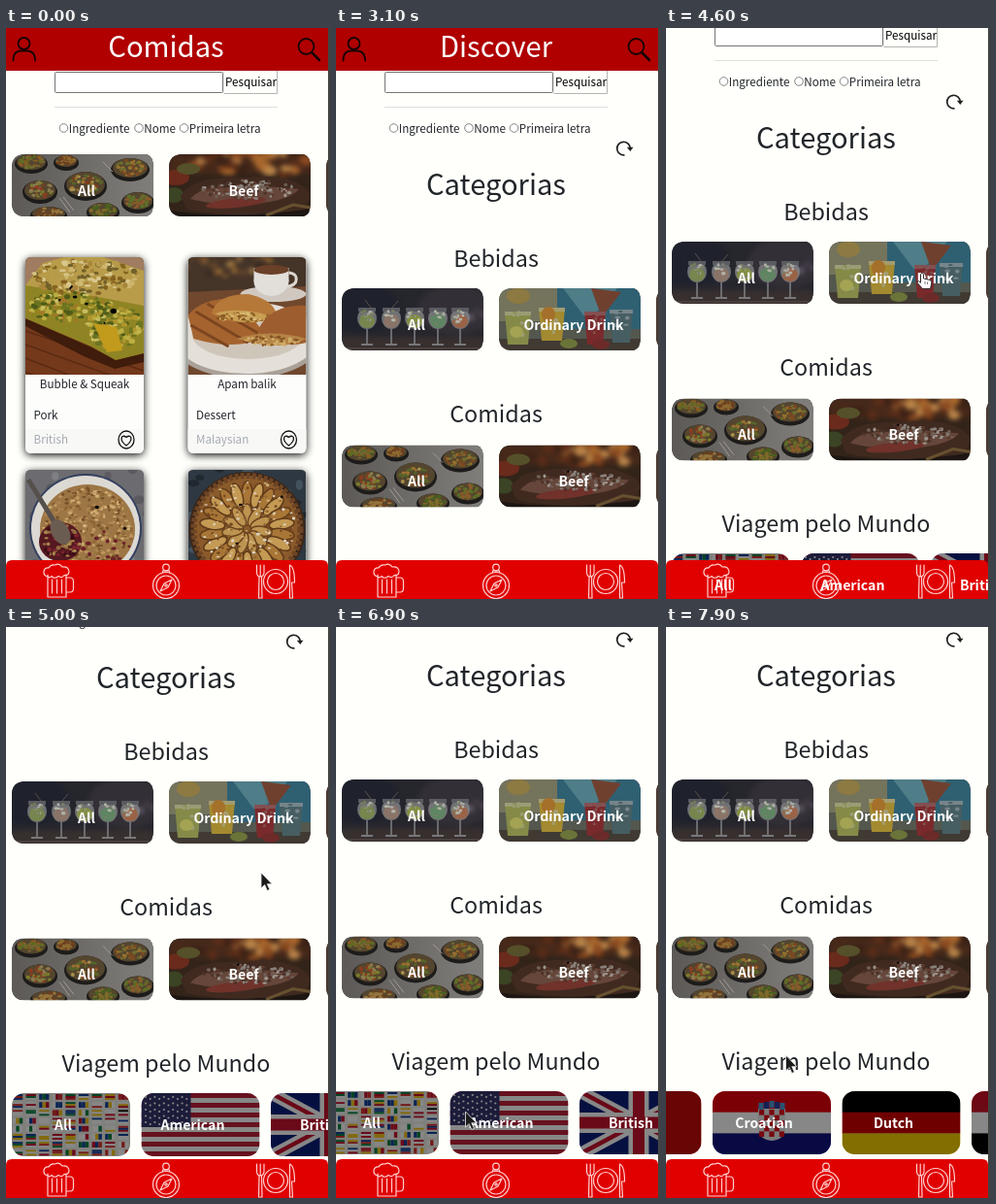
Animation of 334 by 588 pixels, one loop 8000 ms. Source, as an HTML page:

```html
<!DOCTYPE html>
<html lang="pt">
<head>
<meta charset="utf-8">
<title>Receitas</title>
<style>
html, body { margin: 0; width: 100%; height: 100%; overflow: hidden; background: #fffffb; }
svg { display: block; width: 334px; height: 588px; }
text { font-family: "Noto Sans CJK JP", "Noto Sans CJK SC", "Noto Sans", sans-serif; font-size: 11.65px; fill: #212529; }
.h1 { font-size: 29.15px; }
.h2 { font-size: 23.35px; }
.tag { font-size: 14.1px; font-weight: 700; fill: #fff; }
.box { filter: drop-shadow(0 2px 4px rgba(0,0,0,.95)); }
.soft { filter: blur(.6px); }
.haze { filter: blur(2.5px); }
.ico { fill: none; stroke: #ffd0d0; stroke-width: 1.2; stroke-linecap: round; stroke-linejoin: round; }
.blk { fill: none; stroke: #170404; stroke-width: 1.8; stroke-linecap: round; stroke-linejoin: round; }
</style>
</head>
<body>
<svg id="stage" viewBox="0 0 334 588" xmlns="http://www.w3.org/2000/svg"></svg>
<script>
const E = (x, y, rx, ry, fill, more = '') => `<ellipse cx="${x}" cy="${y}" rx="${rx}" ry="${ry}" fill="${fill}" ${more}/>`;
const R = (x, y, w, h, fill, more = '') => `<rect x="${x}" y="${y}" width="${w}" height="${h}" fill="${fill}" ${more}/>`;
const P = (d, fill, more = '') => `<path d="${d}" fill="${fill}" ${more}/>`;
const L = (d, color, w = 1) => `<path d="${d}" fill="none" stroke="${color}" stroke-width="${w}"/>`;
const T = (x, y, s, cls = '', more = '') => `<text x="${x}" y="${y}" class="${cls}" ${more}>${s}</text>`;
const M = (x, y, s, cls, more = '') => T(x, y, s, cls, 'text-anchor="middle" ' + more);
const G = (id, s, more = '') => `<g id="${id}" ${more}>${s}</g>`;
const at = (x, y, s, more = '') => `<g transform="translate(${x} ${y})" ${more}>${s}</g>`;
const many = (n, fn) => Array.from({ length: n }, (_, i) => fn(i)).join('');
const soft = (s, cls = 'soft') => `<g class="${cls}">${s}</g>`;

let seed = 7;
const rnd = (a = 0, b = 1) => {
  seed = (seed * 16807) % 2147483647;
  return +(a + (b - a) * seed / 2147483647).toFixed(2);
};
const pick = list => list[Math.floor(rnd() * list.length)];
// random flecks inside an ellipse
const flecks = (n, x, y, rx, ry, colors, size) => many(n, () => {
  const a = rnd(0, 6.283), d = Math.sqrt(rnd());
  return E((x + rx * d * Math.cos(a)).toFixed(1), (y + ry * d * Math.sin(a)).toFixed(1),
    rnd(size * .5, size), rnd(size * .35, size * .8), pick(colors));
});

// category pictures, 146 x 64
const bowl = (x, y, rx, ry, c) => E(x, y + 2, rx + 2, ry + 2, '#1d1c1b') + E(x, y, rx, ry, '#54452e') +
  flecks(40, x, y, rx * .85, ry * .8, c, 2.6);
const foodAll = () => R(0, 0, 146, 64, 'url(#table)') +
  bowl(20, 8, 15, 8, ['#5f6a24', '#8a5a24', '#766a34']) + bowl(56, 7, 11, 6, ['#8c6a30', '#704020']) +
  bowl(122, 14, 18, 10, ['#96702c', '#7c4a22', '#6c6d30']) + bowl(29, 37, 16, 10, ['#7a7a2c', '#8c3c20', '#8a7a50']) +
  bowl(76, 31, 20, 13, ['#9a7030', '#7e3c1c', '#56642a', '#a8904c']) + bowl(130, 48, 15, 9, ['#5c6e28', '#8a5a2c']) +
  bowl(94, 58, 15, 8, ['#7e6a2a', '#486020']) + bowl(38, 61, 17, 7, ['#6a4020', '#94743c']) +
  L('M49 45L60 60M53 44L64 58M94 8L104 18', '#a19b93', 1);
const beef = () => R(0, 0, 146, 64, '#33241a') +
  soft(R(0, 0, 146, 20, '#47291a') + flecks(34, 85, 9, 62, 13, ['#8a4a20', '#a8662c', '#5b2d18', '#b98448', '#3b2216'], 8), 'haze') +
  E(7, 24, 14, 8, '#6a2a1c') + E(20, 15, 12, 6, '#55502a') + E(5, 42, 10, 8, '#3b4424') +
  P('M12 43C26 22 58 25 82 24C112 20 140 28 146 42L140 57C112 66 40 63 18 56Z', '#402a20') +
  P('M22 46C38 28 62 38 88 32L134 36C120 53 60 56 22 46Z', '#66463a') +
  E(69, 50, 31, 5, '#70322a', 'transform="rotate(-6 69 50)"') +
  flecks(110, 82, 37, 48, 10, ['#88807a', '#6f5f55', '#4c3228', '#9b938c', '#5d3a2c'], 2.6) +
  P('M0 58Q70 68 146 56V64H0Z', '#1d1612') + L('M100 63L128 52L146 55', '#66502f', 3);
const glass = (x, c) => E(x, 31, 10, 11, '#8a8b8c', 'opacity=".75"') + R(x - 9, 20, 18, 4, '#5a5b60') +
  E(x, 34, 8, 7, c) + flecks(14, x, 30, 7, 8, ['#a9aaa4', c, '#7c7f6a', '#b4b3a6'], 2.4) +
  L(`M${x} 42V57M${x - 6} 58H${x + 6}`, '#8c8e92', 1.3);
const drinkAll = () => R(0, 0, 146, 64, '#26262d') +
  soft(E(20, 20, 40, 25, '#1f222c') + E(118, 22, 40, 26, '#332f36') + flecks(12, 135, 28, 12, 6, ['#6a6470', '#50485a'], 3) + R(0, 50, 146, 18, '#38302f'), 'haze') +
  glass(26, '#76864e') + glass(51, '#8a7468') + glass(75, '#849045') + glass(99, '#5f8562') + glass(122, '#9a6347') +
  L('M0 62H146M30 20L24 12M52 20L58 13', '#5a504c', 1);
const tumbler = (x, y, w, c, rim) => P(`M${x} ${y}h${w}l-3 34h${6 - w}z`, c) + R(x, y, w, 4, rim) +
  flecks(14, x + w / 2, y + 14, w * .38, 13, [rim, c], 3);
const ordinary = () => R(0, 0, 146, 64, '#54574e') + R(60, 0, 86, 42, '#2f6072') + P('M66 0L92 34L122 0Z', '#4f7d88') +
  P('M95 0L106 30L126 4Z', '#70402f') + R(0, 0, 60, 34, '#74735c') + E(20, 8, 12, 8, '#8d7a42') + R(0, 52, 146, 12, '#403a33') +
  tumbler(6, 24, 27, '#858a48', '#9a9c75') + tumbler(41, 20, 27, '#a38a30', '#a49c70') +
  tumbler(88, 24, 22, '#7b2a2c', '#835052') + tumbler(114, 22, 24, '#465e62', '#76858a') +
  E(51, 27, 7, 8, '#a4702a') + E(18, 45, 7, 6, '#a4a354') + E(72, 57, 9, 5, '#6a7438') + E(105, 58, 9, 5, '#6c2a28');
const sliver = () => R(0, 0, 146, 64, '#4b3a31');

// flags, 122 x 65
const bands = (...c) => c.map((f, i) => R(0, i * 21.7, 122, 22, f)).join('');
const miniFlags = () => R(0, 0, 122, 65, '#efefe8') + many(72, i => {
  const x = 1 + (i % 9) * 13.6, y = 1 + Math.floor(i / 9) * 8.2;
  const c = () => pick(['#c8102e', '#ffffff', '#ffffff', '#10429c', '#f5c518', '#0a8043', '#d8302c']);
  return rnd() < .4 ? R(x, y, 3.4, 5.8, c()) + R(x + 3.4, y, 3.4, 5.8, c()) + R(x + 6.8, y, 3.4, 5.8, c())
    : R(x, y, 10.2, 2, c()) + R(x, y + 2, 10.2, 2, c()) + R(x, y + 4, 10.2, 1.9, c());
});
const usa = () => many(13, i => R(0, i * 5, 122, 5.1, i % 2 ? '#fff' : '#c02038')) + R(0, 0, 51, 35, '#35356e') +
  many(50, i => E(4.5 + (i % 10) * 4.7, 4 + Math.floor(i / 10) * 6.5 + (i % 2) * 2, 1.1, 1.1, '#fff'));
const uk = () => R(0, 0, 122, 65, '#0c1f78') + L('M0 0L122 65M122 0L0 65', '#fff', 13) + L('M0 0L122 65M122 0L0 65', '#c8102e', 4.5) +
  L('M61 0V65M0 32.5H122', '#fff', 21) + L('M61 0V65M0 32.5H122', '#c8102e', 12);
const canada = () => R(0, 0, 122, 65, '#fff') + R(0, 0, 31, 65, '#e00') + R(91, 0, 31, 65, '#e00') +
  P('M61 9l5 9 5-2-2 13 7-7 1 4 8-1-3 8 3 2-14 11 1 4-11-1v9h-2v-9l-11 1 1-4-14-11 3-2-3-8 8 1 1-4 7 7-2-13 5 2z', '#e00');
const star = (x, y, r) => P('M' + Array.from({ length: 10 }, (_, i) => {
  const q = i % 2 ? r * .4 : r, a = i * Math.PI / 5;
  return (x + q * Math.sin(a)).toFixed(1) + ' ' + (y - q * Math.cos(a)).toFixed(1);
}).join('L') + 'Z', '#fd0');
const china = () => R(0, 0, 122, 65, '#c40a0a') + star(20, 18, 10) + star(39, 7, 3) + star(46, 14, 3) + star(46, 24, 3) + star(39, 31, 3);
const croatia = () => bands('#e8000c', '#fff', '#10107e') +
  P('M47 18H75V37Q75 50 61 51Q47 50 47 37Z', '#e8e8e8') +
  many(25, i => i % 2 ? '' : R(48 + (i % 5) * 5.2, 19 + Math.floor(i / 5) * 5.6, 5.2, 5.6, '#e0101c')) +
  many(5, i => R(47.5 + i * 5.5, 10 + Math.abs(i - 2), 5, 7, i % 2 ? '#2a3fa0' : '#4c9cd8'));
const nations = [
  ['All', miniFlags], ['American', usa], ['British', uk], ['Canadian', canada], ['Chinese', china], ['Croatian', croatia],
  ['Dutch', () => bands('#000', '#d00000', '#f6cf00')],
  ['Egyptian', () => bands('#ce1126', '#fff', '#000') + E(61, 32, 7, 8, '#c09300')]
];
const STEP = 133.5;

const card = (x, y, pic, label = '', id = '') =>
  at(x, y, `<g clip-path="url(#pill)">${R(0, 0, 146, 64, '#33302e')}${soft(pic())}</g>` + M(77, 42.8, label, 'tag'), id && `id="${id}"`);

// recipe pictures, 122 x 121
const quiche = () => R(0, 0, 122, 121, '#74391b') + R(0, 0, 122, 30, '#a07c60') +
  many(6, i => L(`M0 ${62 + i * 14}L122 ${100 + i * 17}`, '#5b2a12', 1.5)) + P('M0 63L68 93L93 106L122 99V108L92 115L60 102L0 71Z', '#3f1c0b') +
  P('M0 29L18 6L40 0H80L122 14V99L93 106L68 92L0 63Z', '#8f8424') + P('M0 29L18 6L40 0H80L122 14V50L70 40Z', '#b89c4a') +
  flecks(170, 60, 20, 56, 18, ['#cdb56c', '#a8853a', '#84621f', '#d8c68c', '#b59a4a', '#71602a'], 3.6) +
  flecks(150, 44, 51, 42, 15, ['#bcae42', '#6b7420', '#4e5c18', '#c9bc60', '#94831f', '#a4772a'], 3.4) +
  flecks(130, 92, 70, 28, 24, ['#bcae42', '#6b7420', '#4e5c18', '#c9bc60', '#b0962e'], 3.6) +
  P('M70 68L94 72L100 96L84 98Z', '#c29a1c');
const pancake = () => R(0, 0, 122, 121, '#453428') +
  soft(flecks(24, 45, 8, 50, 12, ['#a87434', '#6d4a2c', '#c69a58', '#33261f'], 4), 'haze') +
  P('M0 36L122 30V121H0Z', '#70482e') + E(88, 38, 34, 8, '#d0c8c0') + E(86, 25, 18, 15, '#e2deda') + R(68, 11, 36, 14, '#e2deda') +
  E(86, 13, 18, 5, '#6a4028') + L('M104 16Q114 17 111 26Q108 30 102 30', '#dcd6d0', 3) +
  E(60, 87, 76, 38, '#a9a098') + E(60, 83, 74, 37, '#e4dfd8') + E(62, 79, 58, 26, '#cfc6ba') +
  P('M0 60Q14 42 50 42L82 82Q50 97 6 84Z', '#a5642f') + L('M8 56L62 88M20 48L72 78M3 70L42 92', '#7c451f', 3) +
  P('M24 58Q30 38 62 38Q90 44 92 62Q50 74 24 58Z', '#b67838') + P('M28 58Q54 50 90 62Q58 74 28 58Z', '#c9a055') +
  flecks(70, 58, 62, 28, 5, ['#946428', '#d8ba78', '#80541f', '#bd9344'], 2) +
  P('M72 76Q84 48 122 50V88Q95 95 72 76Z', '#9e5d2e') + P('M50 84Q85 73 122 84Q98 98 50 84Z', '#b58446') +
  flecks(60, 86, 86, 28, 5, ['#855324', '#d0ac68'], 2);
const crumble = () => R(0, 0, 122, 121, '#6c6c70') + flecks(60, 60, 60, 80, 80, ['#7e7f84', '#5b5a60'], 7) +
  E(62, 60, 58, 56, '#34405f') + E(62, 60, 56, 54, '#dcd9d3') + E(64, 61, 49, 46, '#9c7644') +
  flecks(420, 64, 61, 46, 43, ['#bf975e', '#8c6536', '#ad8450', '#755028', '#cfae76'], 2.4) +
  E(36, 74, 22, 20, '#551820') + flecks(60, 36, 74, 20, 18, ['#7d2430', '#3c0d15', '#936c40', '#a8884e'], 3) +
  L('M3 10L30 54', '#55504c', 5) + E(36, 64, 9, 14, '#6b5c52', 'transform="rotate(-30 36 64)"') + flecks(16, 84, 80, 25, 18, ['#6c2028'], 3);
const tart = () => R(0, 0, 122, 121, '#2e3842') + flecks(50, 60, 60, 80, 80, ['#42535f', '#20272e'], 7) +
  E(61, 61, 60, 59, '#3b271a') + `<circle cx="61" cy="61" r="55" fill="#8a5a2a" stroke="#6d4424" stroke-width="6" stroke-dasharray="4 2"/>` +
  many(22, i => E(61, 25, 5.5, 13, i % 2 ? '#c49a54' : '#a87636', `stroke="#5f3a1a" stroke-width="1.5" transform="rotate(${(i * 16.36).toFixed(1)} 61 61)"`)) +
  many(11, i => E(61, 46, 5, 11, '#bd9450', `stroke="#6b4420" stroke-width="1.5" transform="rotate(${(i * 32.7).toFixed(1)} 61 61)"`)) +
  flecks(190, 61, 58, 50, 48, ['#ddd2c0', '#d0b27c', '#70451f', '#8f6534'], 2);
const recipe = (x, y, pic, name, kind, area) => at(x, y,
  R(0, 0, 122, 202, '#fdfdfb', 'rx="6" class="box"') + `<g clip-path="url(#photo)">${R(0, 0, 122, 121, '#554a40')}${soft(pic())}</g>` +
  P('M0 177H122V196Q122 202 116 202H6Q0 202 0 196Z', '#f8f8f6') +
  M(61, 135, name) + T(8.5, 167, kind) + T(8.5, 192, area, '', 'style="fill:#a5abb2"') +
  E(104, 188, 8, 9, 'none', 'stroke="#111" stroke-width="1.3"') +
  P('M104 194C96 188 99 181.500 104 185.500C109 181.500 112 188 104 194Z', 'none', 'stroke="#111" stroke-width="1.3"'));

const radio = (x, y, s) => E(x, 103, 4.3, 4.3, '#fff', 'stroke="#767676" stroke-width=".9"') + T(x + 5.3, y, s);
const header = R(0, 0, 334, 44, '#b00000') + M(165, 30, '', 'h1', 'id="title" style="fill:#fff"') +
  `<g class="blk"><circle cx="18.500" cy="16" r="6"/><path d="M7.500 33.500V31Q8.500 24 15 23.500H22Q29 24 30 31V33.500"/><circle cx="309.500" cy="19" r="8"/><path d="M315.500 25.500L323 33" stroke-width="2.600"/></g>` +
  R(50.5, 45.5, 173, 21, '#fff', 'stroke="#767676" rx="1"') + L('M224.500 67V44.500H279', '#ececea') + L('M224.500 67.500H279.500V44', '#b4b4b2') +
  T(226, 60, 'Pesquisar', '', 'style="fill:#000"') + R(50, 81, 230, 1, '#dfdfdc') +
  radio(59.5, 108, 'Ingrediente') + radio(137, 108, 'Nome') + radio(183.5, 108, 'Primeira letra');

const meals = card(6, 130, foodAll, 'All') + card(168, 130, beef, 'Beef') + card(330, 130, sliver) +
  recipe(20, 236, quiche, 'Bubble &amp; Squeak', 'Pork', 'British') + recipe(187.5, 236, pancake, 'Apam balik', 'Dessert', 'Malaysian') +
  recipe(20, 455, crumble, '', '', '') + recipe(187.5, 455, tart, '', '', '');
const discover = L('M297.500 130.800A6.800 6.800 0 1 1 303.300 124', '#222', 1.7) + P('M299.800 122.800H306.500L303.300 127Z', '#222') +
  M(165, 172, 'Categorias', 'h1') + M(165, 246, 'Bebidas', 'h2') + M(165, 406, 'Comidas', 'h2') + M(165, 567, 'Viagem pelo Mundo', 'h2') +
  card(6, 268, drinkAll, 'All', 'd1') + card(168, 268, ordinary, 'Ordinary Drink', 'd2') + card(330, 268, sliver, '', 'd3') +
  card(6, 429.5, foodAll, 'All') + card(168, 429.5, beef, 'Beef', 'm2') + card(330, 429.5, sliver, '', 'm3') +
  G('flags', nations.map(([, pic], i) => at(6 + i * STEP, 589,
    `<g clip-path="url(#flag)">${pic()}${R(0, 0, 122, 65, '#000', 'opacity=".47"')}</g>`)).join(''));
const nav = P('M0 588V554Q0 548 6 548H326Q332 548 332 554V588Z', '#e00000') + `<g class="ico">
  <path d="M43 563V586H62V563M47.500 568V582M52.500 568V582M57.500 568V582M62 566H66Q69.500 566 69.500 570V577Q69.500 581 66 581H62"/>
  <path d="M43 565Q38.500 564 39 559.500Q40 555.500 44 556Q46 552 50.500 553Q55 550.500 58 555Q64 554 65 559.500Q65 564 60 563.500Q58 567 54 564.500Q50 568 47 564.500Q45 567 43 565Z"/>
  <circle cx="165" cy="574" r="13.500"/><circle cx="165" cy="574" r="10"/><circle cx="165" cy="555.500" r="3.300"/>
  <path d="M161.500 560.500V559H168.500V560.500M171 568L167 576L159 580L163 572Z"/><circle cx="165" cy="574" r="1.200"/>
  <circle cx="278" cy="570" r="12.500"/><circle cx="278" cy="570" r="8.500"/>
  <path d="M258.500 553V561Q259 565 262 565Q265.500 565 266 561V553M262.200 553V565M261 565L260.500 587H264L263.500 565"/>
  <path d="M292.500 587V553Q297.500 555 297.500 571H294.500L295.500 587Z"/></g>`;
const arrow = P('M0 0V16L3.700 12.600L6.300 18.500L8.900 17.300L6.300 11.700H11.300Z', '#1c1c1c', 'stroke="#eee" stroke-width=".8"');
const hand = P('M-1.500 1.500Q0 -1 1.500 1.500V6L8 7.500Q10 8 9.800 10.500L8.500 16.500H0.500L-4.800 10.500Q-5 8.500 -3.500 8.700L-1.500 10.300Z', '#fff', 'stroke="#222" stroke-width=".9"') +
  L('M3 9V12M5.500 9.500V12', '#444', .7);

const svg = document.getElementById('stage');
svg.innerHTML = `<defs>
  <clipPath id="pill"><path d="M14 0H139Q146 2 146 14V50Q146 62 139 64H14Q0 64 0 50V14Q0 0 14 0Z"/></clipPath>
  <clipPath id="flag"><rect width="122" height="65" rx="13"/></clipPath>
  <clipPath id="photo"><path d="M0 121V6Q0 0 6 0H116Q122 0 122 6V121Z"/></clipPath>
  <linearGradient id="table"><stop stop-color="#5c5956"/><stop offset="1" stop-color="#807e7b"/></linearGradient></defs>` +
  R(0, 0, 334, 588, '#fffffb') + G('page', header + G('meals', meals) + G('disc', discover)) + nav +
  G('tags', nations.map(([s], i) => M(59 + i * STEP, 627, s, 'tag')).join('')) +
  R(332, 0, 2, 588, '#434341') + G('cur', G('arrow', arrow) + G('hand', hand));

const $ = {};
svg.querySelectorAll('[id]').forEach(n => $[n.id] = n);
const show = (id, on) => $[id].setAttribute('display', on ? 'inline' : 'none');
const move = (id, x, y) => $[id].setAttribute('transform', `translate(${x} ${y})`);

// linear track through [time, value, value...]
const track = (keys, t) => {
  const i = keys.findIndex(k => k[0] > t);
  if (i < 0) return keys[keys.length - 1].slice(1);
  if (i === 0) return keys[0].slice(1);
  const a = keys[i - 1], b = keys[i], f = (t - a[0]) / (b[0] - a[0]);
  return a.slice(1).map((v, j) => v + (b[j + 1] - v) * f);
};
const scrollY = [[4300, 0], [4400, 12], [4500, 32], [4600, 48], [4700, 48], [4800, 70], [4900, 94], [5000, 109], [5100, 111]];
const scrollX = [[6800, 0], [6900, 22], [7000, 45], [7300, 45], [7400, 80], [7500, 195], [7600, 335], [7700, 465], [7800, 565], [7900, 625.5]];
const mouse = [[500, 285, 533], [600, 240, 550], [700, 187, 566], [800, 153, 571], [1600, 153, 571], [2000, 270, 577],
  [3700, 334, 243], [3800, 321, 230], [3900, 309, 217], [4000, 298, 213], [4200, 298, 213], [4300, 290, 222], [4400, 276, 240],
  [4500, 264, 252], [4600, 264, 252], [5000, 263, 253], [5600, 251, 407], [6200, 133.5, 499], [7300, 133.5, 499], [7900, 123.5, 441]];

function draw(ms) {
  const t = Math.floor(ms % 8000 / 100) * 100, disc = t >= 1500;
  const [sy] = track(scrollY, t), [sx] = track(scrollX, t), [x, y] = track(mouse, t);
  $.title.textContent = disc ? 'Discover' : 'Comidas';
  show('meals', !disc);
  show('disc', disc);
  show('tags', disc);
  show('d1', t >= 1700);
  show('d2', t >= 2300);
  show('m2', t >= 2400);
  show('m3', t >= 2400);
  show('d3', t >= 3100);
  move('page', 0, -sy);
  move('flags', -sx, 0);
  move('tags', -sx, -sy);
  const over = top => x > 168 && x < 314 && y > top - sy && y < top + 64 - sy;
  const link = y > 548 || disc && (over(268) || over(429.5));
  show('cur', t >= 500 && t < 2100 || t >= 3800);
  show('hand', link);
  show('arrow', !link);
  move('cur', x, y);
}
const start = performance.now();
const tick = () => {
  draw(performance.now() - start);
  requestAnimationFrame(tick);
};
tick();
</script>
</body>
</html>
```
